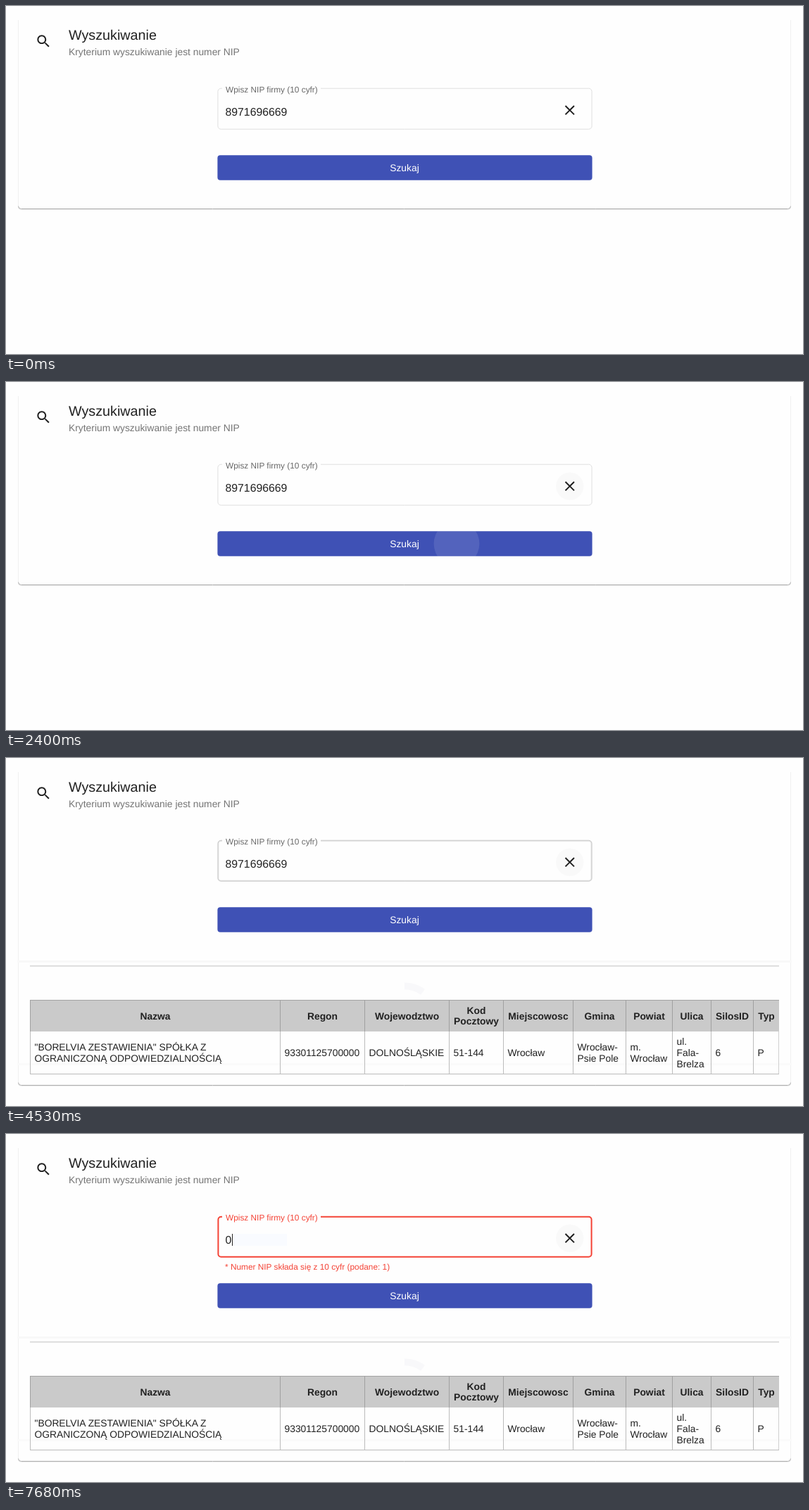
An HTML page with a canvas for the animation above (8000 ms loop, 1132 by 495 pixels).

```html
<!DOCTYPE html>
<html lang="pl">
<head>
<meta charset="utf-8">
<title>Wyszukiwanie</title>
<style>
  html, body { margin: 0; width: 100%; height: 100%; overflow: hidden; background: #fefefe; }
  canvas, svg { position: absolute; left: 0; top: 0; width: 1132px; height: 495px; }
  text {
    font-family: "Liberation Sans", Arial, sans-serif;
    white-space: pre;
    text-rendering: geometricPrecision;
  }
</style>
</head>
<body>
<canvas id="stage" width="1132" height="495"></canvas>
<svg id="texts" viewBox="0 0 1132 495"></svg>
<script>
const LOOP = 8000;
const ZOOM = 0.988; // the whole page is shown slightly reduced
const INK = '#212121', PRIMARY = '#3f51b5', WARN = '#f44336', LINE = '#dfdfdf';
const LEFT = 300.4, RIGHT = 832.6;
const ctx = document.getElementById('stage').getContext('2d');
const svg = document.getElementById('texts');
const NS = 'http://www.w3.org/2000/svg';

const searchIcon = new Path2D('M15.5 14h-.79l-.28-.27C15.41 12.59 16 11.11 16 9.5 16 5.91 13.09 3 9.5 3S3 5.91 3 9.5 5.91 16 9.5 16c1.61 0 3.09-.59 4.23-1.57l.27.28v.79l5 4.99L20.49 19l-4.99-5zm-6 0C7.01 14 5 11.99 5 9.5S7.01 5 9.5 5 14 7.01 14 9.5 11.99 14 9.5 14z');
const closeIcon = new Path2D('M19 6.41L17.59 5 12 10.59 6.41 5 5 6.41 10.59 12 5 17.59 6.41 19 12 13.41 17.59 19 19 17.59 13.41 12z');

const clamp = v => Math.max(0, Math.min(1, v));
const ramp = (t, from, length) => clamp((t - from) / length);
const within = (t, from, to) => t >= from && t < to;
const grey = v => `rgb(${v},${v},${v})`;

// Cubic Bezier timing curve, solved by bisection.
function bezier(x1, y1, x2, y2) {
  const at = (s, a, b) => 3 * (1 - s) * (1 - s) * s * a + 3 * (1 - s) * s * s * b + s * s * s;
  return x => {
    let lo = 0, hi = 1;
    for (let i = 0; i < 24; i++) {
      const mid = (lo + hi) / 2;
      if (at(mid, x1, x2) < x) lo = mid; else hi = mid;
    }
    return at(lo, y1, y2);
  };
}
const rippleEase = bezier(0, 0, 0.2, 1);
const messageEase = bezier(0.55, 0, 0.55, 0.2);

function node(tag, attrs, parent) {
  const el = document.createElementNS(NS, tag);
  for (const key in attrs) el.setAttribute(key, attrs[key]);
  parent.appendChild(el);
  return el;
}
function label(str, x, y, size, fill = INK, more = {}, parent = svg) {
  const el = node('text', { x, y, 'font-size': size * ZOOM, fill, ...more }, parent);
  el.textContent = str;
  return el;
}

label('Wyszukiwanie', 89, 48, 20);
label('Kryterium wyszukiwanie jest numer NIP', 89, 70, 14, '#757575');
const fieldLabel = label('Wpisz NIP firmy (10 cyfr)', 312, 123, 12);
const value = label('', 311.5, 156, 16);
const button = label('Szukaj', 566, 235, 14, '#fff', { 'text-anchor': 'middle', stroke: '#fff' });
const message = label('* Numer NIP składa się z 10 cyfr (podane: 1)', 311, 193, 12, WARN);
const table = node('g', {}, svg);

// Left edge, heading lines, cell lines.
const columns = [
  [34, ['Nazwa'], ['"BORELVIA ZESTAWIENIA" SPÓŁKA Z', 'OGRANICZONĄ ODPOWIEDZIALNOŚCIĄ']],
  [389, ['Regon'], ['93301125700000']],
  [509, ['Wojewodztwo'], ['DOLNOŚLĄSKIE']],
  [629, ['Kod', 'Pocztowy'], ['51-144']],
  [706, ['Miejscowosc'], ['Wrocław']],
  [805, ['Gmina'], ['Wrocław-', 'Psie Pole']],
  [880, ['Powiat'], ['m.', 'Wrocław']],
  [946, ['Ulica'], ['ul.', 'Fala-', 'Brelza']],
  [1001, ['SilosID'], ['6']],
  [1061, ['Typ'], ['P']]
];
const TABLE_RIGHT = 1098;

function lines(list, x, middle, more) {
  list.forEach((str, i) => {
    const y = middle + 5 + (i - (list.length - 1) / 2) * 16 * ZOOM;
    label(str, x, y, 14, INK, more, table);
  });
}
columns.forEach(([x, head, cell], i) => {
  const right = i + 1 < columns.length ? columns[i + 1][0] : TABLE_RIGHT;
  lines(head, (x + right + 1) / 2, 366.5, { 'text-anchor': 'middle', 'font-weight': 700 });
  lines(cell, x + 6.5, 419, {});
});

function rect(x, y, w, h, fill) {
  ctx.fillStyle = fill;
  ctx.fillRect(x, y, w, h);
}
function icon(path, x, y, fill) {
  ctx.save();
  ctx.translate(x, y);
  ctx.scale(ZOOM, ZOOM);
  ctx.fillStyle = fill;
  ctx.fill(path);
  ctx.restore();
}
function disc(x, y, r, fill) {
  ctx.fillStyle = fill;
  ctx.beginPath();
  ctx.arc(x, y, r, 0, 2 * Math.PI);
  ctx.fill();
}

function card(bottom) {
  rect(17, 20, 1, bottom - 24, '#f0f0f0');
  rect(1114, 20, 1, bottom - 24, '#f0f0f0');
  [[1.5, '#e6e6e6'], [0.5, '#b0b0b0']].forEach(([dy, color]) => {
    ctx.strokeStyle = color;
    ctx.lineWidth = 1;
    ctx.beginPath();
    ctx.moveTo(17.5, bottom - 4 + dy);
    ctx.arcTo(17.5, bottom + dy, 22, bottom + dy, 4);
    ctx.lineTo(1110, bottom + dy);
    ctx.arcTo(1114.5, bottom + dy, 1114.5, bottom - 4 + dy, 4);
    ctx.stroke();
  });
}

// Field border with a notch for the label.
function outline(width, color, alpha = 1) {
  const d = width / 2, l = LEFT + d, r = RIGHT - d, top = 116.7 + d, bottom = 175.7 - d, rad = 5 - d;
  ctx.save();
  ctx.globalAlpha = alpha;
  ctx.strokeStyle = color;
  ctx.lineWidth = width;
  ctx.beginPath();
  ctx.moveTo(447, top);
  ctx.arcTo(r, top, r, bottom, rad);
  ctx.arcTo(r, bottom, l, bottom, rad);
  ctx.arcTo(l, bottom, l, top, rad);
  ctx.arcTo(l, top, 307, top, rad);
  ctx.lineTo(307, top);
  ctx.stroke();
  ctx.restore();
}

function rippleAlpha(t) {
  if (t < 2400 || t >= 4530) return 0;
  if (t >= 2940) return 0.04;
  return 0.1 - 0.045 * ramp(t, 2690, 100);
}
function drawButton(t) {
  ctx.save();
  ctx.beginPath();
  ctx.roundRect(LEFT, 212.3, RIGHT - LEFT, 36 * ZOOM, 4);
  ctx.clip();
  rect(300, 212, 533, 36, PRIMARY);
  const alpha = rippleAlpha(t);
  if (alpha) disc(640, 230, 342 * rippleEase(ramp(t, 2390, 450)), `rgba(255,255,255,${alpha})`);
  ctx.restore();
}

function arc(from, to, color) {
  const rad = deg => (deg - 90) * Math.PI / 180;
  ctx.strokeStyle = color;
  ctx.lineWidth = 10 * ZOOM;
  ctx.beginPath();
  ctx.arc(566, 368.8, 45 * ZOOM, rad(from), rad(to));
  ctx.stroke();
}

function drawTable() {
  rect(34, 295.4, 1064, 1, '#c0c0c0');
  rect(34, 344, 1064, 45, '#cacaca');
  rect(34, 344, 1064, 1, '#a4a4a4');
  rect(34, 449, 1064, 1, '#bcbcbc');
  columns.forEach(([x]) => {
    rect(x, 344, 1, 45, '#a0a0a0');
    rect(x, 389, 1, 60, '#bcbcbc');
  });
  rect(1097, 389, 1, 60, '#d0d0d0');
}

function drawField(t) {
  const error = t >= 6720, focus = t >= 5940, selected = within(t, 6090, 6720);
  let hover = 0;
  if (within(t, 960, 1440)) hover = ramp(t, 930, 240);
  if (t >= 4530) hover = ramp(t, 4500, 240);
  const pale = t < 1440 || within(t, 4530, 5010) ? hover : 0;
  const accent = error ? WARN : focus ? PRIMARY : INK;

  if (hover < 1) outline(1, LINE, 1 - hover);
  if (hover > 0) outline(2, accent, hover);

  const seen = ramp(t, 930, 240);
  if (t >= 960) disc(800.8, 148.2, 20 * ZOOM, `rgba(0,0,0,${0.018 * seen})`);
  icon(closeIcon, 788.9, 136.3, grey(30 + 14 * pale));

  if (selected) rect(312, 142, 88, 18, '#3390ff');
  if (error) {
    rect(323, 142, 76, 17, '#f9fbff');
    if (!within(t, 7200, 7680)) rect(321, 142, 1, 17, INK);
  }
  value.textContent = error ? '0' : '8971696669';
  value.setAttribute('fill', selected ? '#fff' : grey(33 + 22 * pale));
  fieldLabel.setAttribute('fill', focus ? accent : grey(104 + 26 * pale));
}

function draw(t) {
  const loading = within(t, 2550, 2640), done = t >= 2640;
  rect(0, 0, 1132, 495, '#fefefe');

  card(done ? 465 : loading ? 433.5 : 288);
  if (loading || done) rect(16, 288, 1100, 3, '#f8f8f8');
  if (done) {
    rect(16, 434, 1100, 3, '#fafafa');
    arc(0, 36, '#f8f8fa');
    drawTable();
  }
  if (loading) {
    const start = Math.max(0, (t - 2565) * 0.18);
    arc(start, start + 28, PRIMARY);
  }

  icon(searchIcon, 41.4, 38.3, INK);
  drawField(t);
  drawButton(t);

  table.setAttribute('visibility', done ? 'visible' : 'hidden');
  button.setAttribute('stroke-width', within(t, 6720, 7020) ? 0.3 : 0);
  const shown = messageEase(ramp(t, 6720, 300));
  message.setAttribute('opacity', shown);
  message.setAttribute('transform', `translate(0 ${-5 * (1 - shown)})`);
}

const begin = performance.now();
function tick() {
  draw((performance.now() - begin) % LOOP);
  requestAnimationFrame(tick);
}
tick();
</script>
</body>
</html>
```
